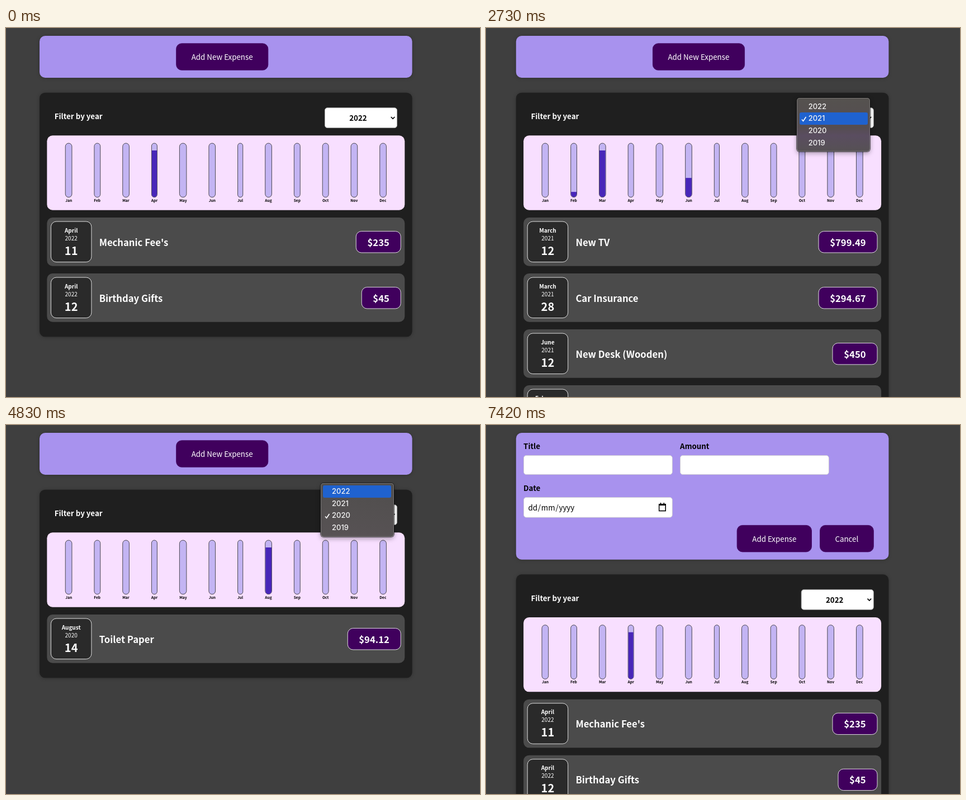
These frames come from a looping animation (848 by 660 pixels, 8000 ms). An HTML page:

```html
<!DOCTYPE html>
<html lang="en">
<head>
<meta charset="utf-8">
<title>Expenses</title>
<style>
  * { box-sizing: border-box; }
  html, body { margin: 0; width: 100%; height: 100%; overflow: hidden; background: #3f3f3f; }
  body { position: relative; font: 16px 'Noto Sans CJK JP', 'Noto Sans CJK SC', 'Noto Sans JP', 'Noto Sans CJK', sans-serif; }

  /* The page is laid out at full size and shown at five sixths. */
  #page { position: absolute; left: 0; top: 0; width: 800px; transform-origin: 0 0; transform: translate(60px, 14px) scale(.83333); }
  .scrolls #page { transform: translate(53.75px, 14px) scale(.83333); }

  .panel { position: relative; border-radius: 12px; box-shadow: 0 1px 8px rgba(0, 0, 0, .25); }
  #entry { height: 90px; background: #a892ee; }
  .form #entry { height: 272px; }
  #card { margin-top: 32px; padding: 92px 16px 32px; background: #1f1f1f; }

  .button { position: absolute; height: 58px; padding: 16px 32px; border: 1px solid #40005d; border-radius: 12px;
            background: #40005d; color: #fff; line-height: 24px; white-space: nowrap; }
  #add { top: 16px; left: 392px; transform: translateX(-50%); }
  .hover #add { background: #510674; border-color: #510674; }
  .form #add, #fields { display: none; }
  .form #fields { display: block; }
  .field { position: absolute; width: 320px; }
  .field b { display: block; height: 24px; line-height: 24px; margin-bottom: 8px; }
  .input { position: relative; height: 42px; padding: 8px; border: 1px solid #ccc; border-radius: 6px; background: #fff; line-height: 25px; }
  .date .input { height: 44px; line-height: 27px; }
  .input span { padding: 0 1px; }
  .input svg { position: absolute; fill: none; stroke: #000; }
  #spinner { display: none; right: 12px; top: 12px; }
  .spin #spinner { display: block; }

  #filter { position: absolute; left: 32px; top: 38px; line-height: 24px; color: #fff; }
  #select { position: absolute; right: 32px; top: 32px; width: 156px; height: 44px; padding-left: 52px; border: 1px solid #aaa;
            border-radius: 6px; background: #fff; font-weight: 700; line-height: 43px; }
  #select svg { position: absolute; right: 3px; top: 17px; fill: none; stroke: #000; stroke-width: 2; }
  .ring #select { border-color: #1660cc; box-shadow: inset 0 0 0 1px #1660cc, 0 0 0 1.6px #fff; }

  #chart { display: flex; justify-content: space-around; height: 160px; padding: 16px; border-radius: 12px; background: #f8dfff; }
  .month { display: flex; flex-direction: column; font-size: 8px; font-weight: 700; line-height: 11px; }
  .bar { flex: 1; display: flex; align-items: flex-end; border: 1px solid #313131; border-radius: 12px; overflow: hidden; background: #c3b4f3; }
  .bar i { width: 100%; background: #4826b9; }

  .item { display: flex; align-items: center; height: 104px; margin-top: 16px; padding: 8px; border-radius: 12px;
          background: #4b4b4b; color: #fff; font-size: 20px; font-weight: 700; }
  .day { display: flex; flex-direction: column; align-items: center; justify-content: center; width: 88px; height: 88px;
         margin-right: 16px; border: 1px solid #fff; border-radius: 12px; background: #2a2a2a; font-size: 12px; line-height: 17px; }
  .day span { font-weight: 400; }
  .day b { font-size: 24px; line-height: 35px; }
  .price { margin-left: auto; padding: 8px 24px; border: 1px solid #fff; border-radius: 12px; background: #40005d; line-height: 29px; }

  #menu { position: absolute; left: 562.5px; width: 131px; height: 96px; padding: 4.5px; border-radius: 5px;
          background: linear-gradient(#504e4d, #575254);
          box-shadow: inset 0 0 0 1px rgba(255, 255, 255, .22), 0 0 0 1px rgba(0, 0, 0, .55), 0 3px 9px rgba(0, 0, 0, .35);
          color: #f4f4f4; font: 500 13px/21.7px Inter, 'Liberation Sans', sans-serif; }
  .scrolls #menu { left: 556.2px; background: linear-gradient(#55524f, #554d51 55%, #5a4d60 70%, #565154); }
  #menu div { position: relative; height: 21.7px; padding-left: 16px; border-radius: 3px; }
  #menu .lit { background: #1f62cf; }
  #menu svg { position: absolute; left: 3px; top: 7px; fill: none; stroke: #fff; stroke-width: 1.6; }
</style>
</head>
<body>
<div id="page">
  <div class="panel" id="entry">
    <div class="button" id="add">Add New Expense</div>
    <div id="fields">
      <div class="field" style="left:16px;top:16px"><b>Title</b><div class="input"></div></div>
      <div class="field" style="left:352px;top:16px"><b>Amount</b><div class="input">
        <svg id="spinner" width="8" height="16"><path d="M1 5l3-3 3 3M1 11l3 3 3-3" stroke-width="1.5"/></svg>
      </div></div>
      <div class="field date" style="left:16px;top:106px"><b>Date</b><div class="input"><span>dd</span>/<span>mm</span>/<span>yyyy</span>
        <svg width="16" height="19" style="right:13px;top:11px"><path d="M1 3.5h14v14H1zM1 5h14M4.5 0v4M11.500 0v4" stroke-width="2"/></svg>
      </div></div>
      <div class="button" style="top:198px;right:165px">Add Expense</div>
      <div class="button" style="top:198px;right:32px">Cancel</div>
    </div>
  </div>
  <div class="panel" id="card">
    <b id="filter">Filter by year</b>
    <div id="select"><span id="year"></span><svg width="11" height="9"><path d="M1.500 2l4 4 4-4"/></svg></div>
    <div id="chart"></div>
    <div id="list"></div>
  </div>
</div>
<div id="menu"></div>
<script>
const LOOP = 8000, STEP = 70, EASE = 280;
const MONTHS = 'Jan Feb Mar Apr May Jun Jul Aug Sep Oct Nov Dec'.split(' ');
const YEARS = [2022, 2021, 2020, 2019];
const EXPENSES = {
  2022: [['April', 11, "Mechanic Fee's", '$235'], ['April', 12, 'Birthday Gifts', '$45']],
  2021: [['March', 12, 'New TV', '$799.49'], ['March', 28, 'Car Insurance', '$294.67'],
         ['June', 12, 'New Desk (Wooden)', '$450'], ['February', 11, 'Groceries', '$120']],
  2020: [['August', 14, 'Toilet Paper', '$94.12']]
};
// Each visit to the menu: when it opens, the row lit at each time, and when a row is picked.
const VISITS = [
  { open: 1120, lit: [[1120, 0], [1470, 1]], pick: 1680, from: 2022, to: 2021 },
  { open: 2730, lit: [[2730, 1], [3010, 2]], pick: 3290, from: 2021, to: 2020 },
  { open: 4200, lit: [[4200, 2], [4620, 1], [4830, 0]], pick: 5320, from: 2020, to: 2022 }
];
const PICK_TO_CLOSED = 350, PICK_TO_SWITCH = 420;
const HOVER = 6230, FORM = 6580, SPIN = [7140, 7350];

const $ = id => document.getElementById(id);
const menu = $('menu');

$('chart').innerHTML = MONTHS.map(m => `<div class="month"><div class="bar"><i></i></div>${m}</div>`).join('');
const fills = [...document.querySelectorAll('.bar i')];

function monthShares(year) {
  const sums = MONTHS.map(m => EXPENSES[year].filter(e => e[0].startsWith(m))
    .reduce((sum, e) => sum + +e[3].slice(1), 0));
  const top = Math.max(...sums);
  return sums.map(s => 100 * s / top);
}
const shares = Object.fromEntries(Object.keys(EXPENSES).map(y => [y, monthShares(y)]));

let shownYear;
function showYear(year) {
  if (year === shownYear) return;
  shownYear = year;
  $('year').textContent = year;
  $('list').innerHTML = EXPENSES[year].map(([month, day, title, price]) =>
    `<div class="item"><div class="day">${month}<span>${year}</span><b>${day}</b></div>${title}<div class="price">${price}</div></div>`).join('');
}

let shownMenu;
function showMenu(visit, t) {
  const open = visit && t < visit.pick + PICK_TO_CLOSED;
  menu.style.display = open ? 'block' : 'none';
  if (!open) return;
  const since = t - visit.pick;
  const blink = since >= 0 && since < STEP;
  const row = blink ? -1 : visit.lit.filter(l => t >= l[0]).pop()[1];
  const checked = YEARS.indexOf(visit.from);
  menu.style.top = 146.9 - 21.7 * checked + 'px';
  menu.style.opacity = since < 2 * STEP ? 1 : Math.max(0, 1 - (since - STEP) / (4 * STEP));
  const key = row + '/' + checked;
  if (key === shownMenu) return;
  shownMenu = key;
  const tick = '<svg width="10" height="10"><path d="M1 5.500l2.500 3L8.500 1"/></svg>';
  menu.innerHTML = YEARS.map((y, i) =>
    `<div class="${i === row ? 'lit' : ''}">${i === checked ? tick : ''}${y}</div>`).join('');
}

function render(t) {
  const visit = VISITS.filter(v => t >= v.open).pop();
  const switchAt = visit ? visit.pick + PICK_TO_SWITCH : Infinity;
  const switched = t >= switchAt;
  const year = visit ? (switched ? visit.to : visit.from) : 2022;
  const form = t >= FORM;

  showYear(year);
  showMenu(visit, t);
  const p = switched ? Math.min(1, (t - switchAt) / EASE) : 0;
  const eased = p * (2 - p);
  const before = shares[visit ? visit.from : year];
  fills.forEach((fill, i) => {
    fill.style.height = before[i] + (shares[year][i] - before[i]) * eased + 'px';
  });

  const flags = {
    form, scrolls: form || year === 2021, ring: switched && !form,
    hover: t >= HOVER && !form, spin: t >= SPIN[0] && t < SPIN[1]
  };
  for (const name in flags) document.body.classList.toggle(name, flags[name]);
}

const start = performance.now();
function tick() {
  const t = (performance.now() - start) % LOOP;
  render(Math.floor(t / STEP) * STEP);
  requestAnimationFrame(tick);
}
tick();
</script>
</body>
</html>
```
